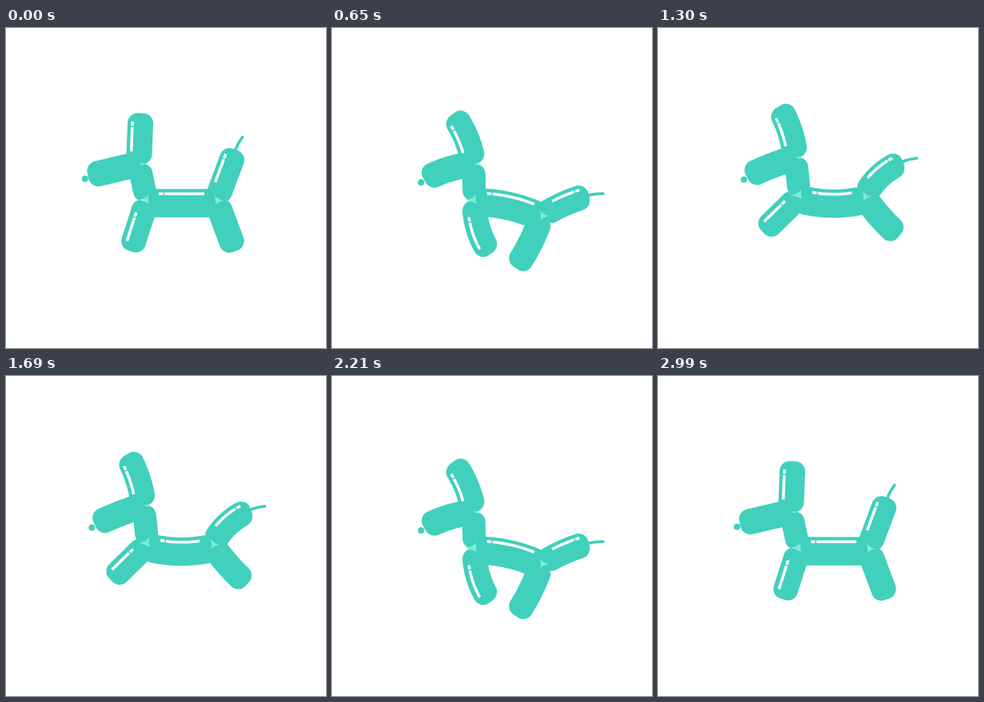
Write an HTML page with a canvas that moves like this. It is 400 by 400 pixels and loops after 3120 ms.

```html
<!DOCTYPE html>
<html lang="en">
<head>
<meta charset="utf-8">
<title>Balloon dog</title>
<style>
html, body { margin: 0; width: 100%; height: 100%; overflow: hidden; background: #fff; }
canvas { display: block; width: 400px; height: 400px; }
</style>
</head>
<body>
<canvas id="stage" width="400" height="400"></canvas>
<script>
const ctx = document.getElementById('stage').getContext('2d');
const STEP = 130, ROUND = 12.5;
const TEAL = '#40d0bc', MINT = '#7eead8';

// Each balloon is named after its far end: [near joint, half width, overlap, drop].
const BALLOONS = {
  ear: ['head', 16, 0, 0],
  nose: ['head', 16, 0, 0],
  chest: ['head', 14.5, 0, 0],
  paw: ['chest', 15.5, 0, 0],
  hip: ['chest', 17.7, 4, 3],
  foot: ['hip', 15.7, 0, 0],
  tail: ['hip', 15.7, 0, 0]
};
// Glints run along a balloon: [from, to, sideways shift].
const GLINTS = {
  ear: [0.83, 0.24, -10],
  hip: [0.2, 0.8, -11.7],
  paw: [0.27, 0.84, 8.2],
  tail: [0.86, 0.31, -9.5]
};

// Key points: x, y and how far the balloon ending there bows out.
const stand = {
  head: [166, 170, 0], chest: [176, 216, 0], hip: [263, 216, 0],
  ear: [168.5, 106.5, 0], nose: [102.5, 185, 0],
  paw: [155.7, 279, 0], foot: [286.5, 279, 0], tail: [286.8, 152, 0]
};
const leap = {
  head: [172, 162, 0], chest: [177, 210, 0], hip: [258, 211, 6],
  ear: [151, 98, 3.5], nose: [111, 186, 1.5],
  paw: [131, 255, 0], foot: [301.6, 260, 2], tail: [306, 167, -6]
};
const stretch = {
  head: [169, 164, 0], chest: [175, 213, 0], hip: [258, 203, 5],
  ear: [149, 101, 3.5], nose: [107, 185, 1.5],
  paw: [133.4, 265, 0], foot: [292.7, 262, 0], tail: [321.5, 187, -8]
};
const gather = {
  head: [177, 170, 0], chest: [178, 216, 0], hip: [262, 235, -6],
  ear: [151, 107.5, 4], nose: [115, 189.5, 3],
  paw: [198, 282.5, 5.5], foot: [229.5, 300, -2.5], tail: [321, 209, -2.5]
};

const between = (p, q) => Object.fromEntries(
  Object.keys(p).map(k => [k, p[k].map((v, i) => (v + q[k][i]) / 2)]));

const poses = [stand, leap, between(leap, stretch), stretch, between(stretch, gather), gather];

// Returns place(t, side): the point at t along a balloon, moved sideways.
function spine(pose, name) {
  const [from, , overlap, drop] = BALLOONS[name];
  const [x0, y0] = pose[from], [x1, y1, bow] = pose[name];
  const length = Math.hypot(x1 - x0, y1 - y0);
  const ux = (x1 - x0) / length, uy = (y1 - y0) / length;
  const place = (t, side = 0) => {
    const slope = 4 * bow * (1 - 2 * t) / length, norm = Math.hypot(1, slope);
    const along = t * length + overlap * (2 * t - 1) - side * slope / norm;
    const off = 4 * bow * t * (1 - t) + side / norm;
    return [x0 + ux * along - uy * off, y0 + uy * along + ux * off + drop];
  };
  place.length = undefined;
  return { place, length: length + 2 * overlap };
}

function path(points) {
  ctx.beginPath();
  for (const p of points) ctx.lineTo(...p);
}

function balloon(pose, name) {
  const { place, length } = spine(pose, name), half = BALLOONS[name][1];
  const left = [], right = [], n = 40;
  for (let i = 0; i <= n; i++) {
    const t = (1 - Math.cos(Math.PI * i / n)) / 2;
    const inset = Math.max(0, ROUND - Math.min(t, 1 - t) * length);
    const w = half - ROUND + Math.sqrt(ROUND * ROUND - inset * inset);
    left.push(place(t, w));
    right.unshift(place(t, -w));
  }
  path(left.concat(right));
  ctx.fill();
}

function glint(pose, name) {
  const { place } = spine(pose, name), [from, to, side] = GLINTS[name];
  path(Array.from({ length: 17 }, (_, i) => place(from + (to - from) * i / 16, side)));
  ctx.stroke();
}

function string(pose) {
  const { place } = spine(pose, 'tail');
  const [x, y] = place(1), [px, py] = place(0.98);
  const a = Math.atan2(y - py, x - px), b = a + 0.16;
  ctx.beginPath();
  ctx.moveTo(x, y);
  ctx.quadraticCurveTo(x + 8 * Math.cos(a), y + 8 * Math.sin(a),
    x + 18 * Math.cos(b), y + 18 * Math.sin(b));
  ctx.stroke();
}

// A triangle around a joint, with sides bent inwards.
function knot([x, y], ...corners) {
  ctx.beginPath();
  ctx.moveTo(x + corners[2][0], y + corners[2][1]);
  corners.forEach(([cx, cy], i) => {
    const [bx, by] = corners[(i + 2) % 3];
    ctx.quadraticCurveTo(x + (bx + cx) / 4, y + (by + cy) / 4, x + cx, y + cy);
  });
  ctx.fill();
}

function draw(pose) {
  ctx.fillStyle = '#fff';
  ctx.fillRect(0, 0, 400, 400);

  ctx.fillStyle = ctx.strokeStyle = TEAL;
  for (const name in BALLOONS) balloon(pose, name);
  ctx.beginPath();
  ctx.arc(pose.nose[0] - 3.7, pose.nose[1] + 3.6, 4, 0, 7);
  ctx.fill();
  ctx.lineCap = 'round';
  ctx.lineWidth = 3.6;
  string(pose);

  ctx.fillStyle = MINT;
  knot(pose.chest, [2, -8], [3, 4], [-11, -1]);
  knot(pose.hip, [-2, -7], [9, 0], [-1, 5]);
  knot(pose.head, [1, -1], [9, -1], [5, 2]);

  ctx.strokeStyle = '#fff';
  ctx.lineCap = 'butt';
  ctx.lineWidth = 3.5;
  ctx.setLineDash([5.5, 1.5, 99, 0]);
  for (const name in GLINTS) glint(pose, name);
  ctx.setLineDash([]);
}

const start = performance.now();
function tick() {
  // The gallop runs forwards, then backwards.
  const k = Math.floor((performance.now() - start) / STEP) % 12;
  draw(poses[k < 6 ? k : 11 - k]);
  requestAnimationFrame(tick);
}
tick();
</script>
</body>
</html>
```
